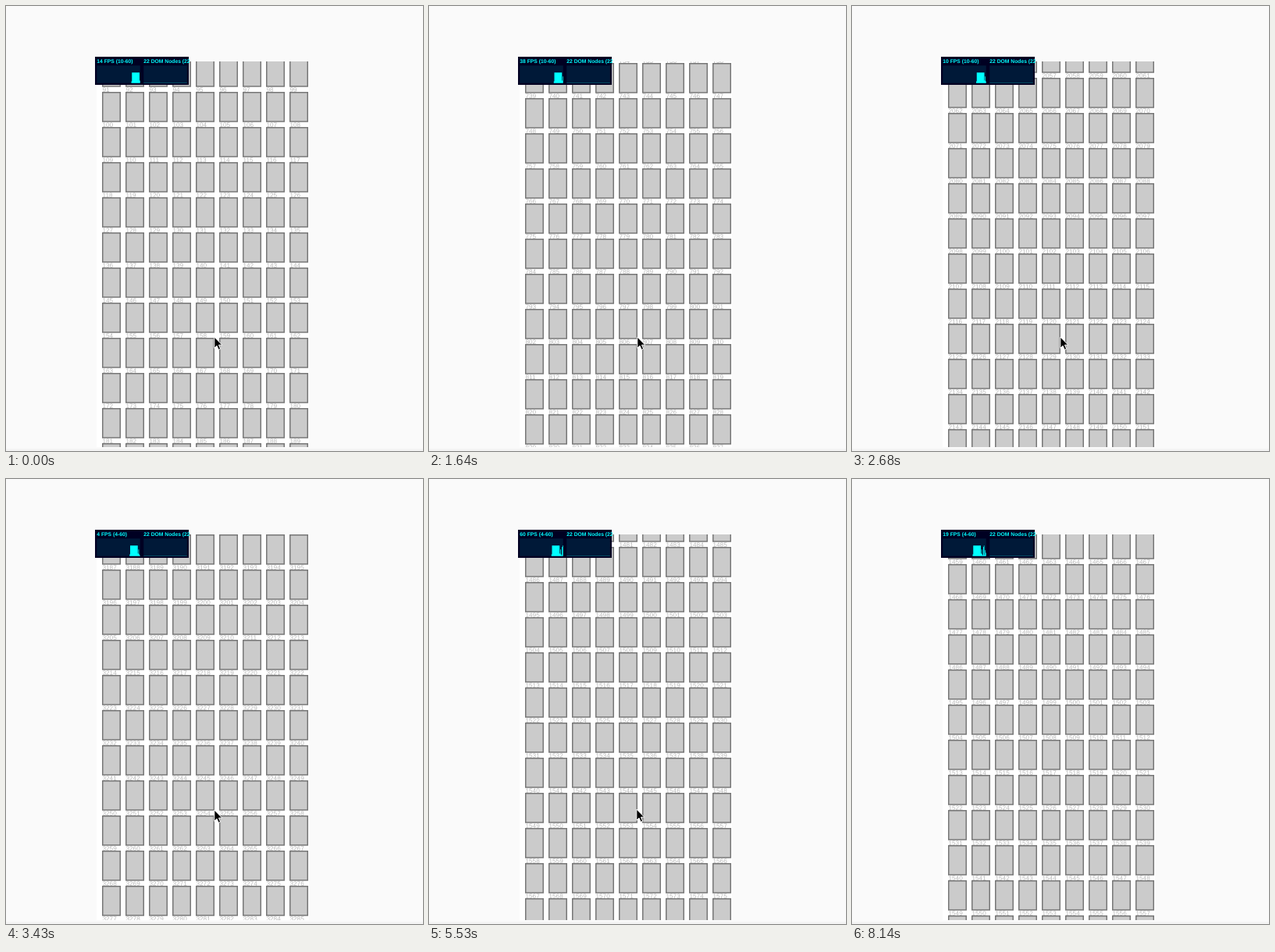
An HTML page for the animation above (8240 ms loop, 534x570 px).

```html
<!DOCTYPE html>
<html lang="en">
<head>
<meta charset="utf-8">
<title>Infinite scroll grid</title>
<style>
  html, body { margin: 0; width: 100%; height: 100%; overflow: hidden; background: #fafafa; }
  svg { display: block; width: 534px; height: 570px; }
  text { font-family: "Liberation Sans", Arial, sans-serif; text-rendering: geometricPrecision; }
  .cell { fill: #cbcbcb; stroke: #777; stroke-width: 1.5; }
  .label { font-size: 8.2px; fill: #b8b8b8; }
  .stat { font-size: 6.75px; font-weight: bold; fill: #0ff; }
</style>
</head>
<body>
<svg viewBox="0 0 534 570">
  <defs>
    <clipPath id="view"><rect x="114" y="71" width="274" height="494"/></clipPath>
    <clipPath id="meter"><rect x="114" y="65" width="121" height="36"/></clipPath>
  </defs>
  <rect width="534" height="570" fill="#fafafa"/>
  <rect y="567" width="534" height="3" fill="#f4f4f4"/>
  <rect x="116" y="71" width="272" height="494" fill="#fff"/>
  <g id="grid" clip-path="url(#view)"></g>
  <g clip-path="url(#meter)">
    <rect x="114" y="65" width="120" height="36" fill="#002"/>
    <rect x="116.25" y="76.25" width="55.5" height="22.5" fill="#001938"/>
    <rect x="176.25" y="76.25" width="55.5" height="22.5" fill="#001938"/>
    <rect x="176.25" y="98.1" width="55.5" height=".65" fill="#05697c"/>
    <path id="bars" fill="#0ff"/>
    <text id="fps" class="stat" x="116.25" y="73.4"/>
    <text class="stat" x="176.25" y="73.4">22 DOM Nodes (22-22)</text>
  </g>
  <path id="cursor" d="M0 0V14.2L3.2 11.2L5.4 16.3L7.9 15.2L5.7 10.2H10Z"
        fill="#000" stroke="#fff" stroke-width="1"/>
</svg>
<script>
const LOOP = 8240, COLS = 9, ROWS = 12, PITCH_X = 30, PITCH_Y = 45, TOP = 71, LEFT = 123;
const FRAME = 148, METER_PERIOD = 1017;

// The page repaints in short bursts and rests in between
const BURSTS = [[0, 450], [740, 1780], [1780, 3580], [4930, 5530], [5800, 5950],
  [6250, 6250], [6690, 6990], [6990, 7840]];

// Where the scroll offset turns or changes speed
const STOPS = [[0, 456], [450, 640], [1040, 960], [2080, 5768], [3430, 15930], [4780, 15952],
  [5530, 7409], [6250, 2785], [6990, 2119], [7840, 7297]];

const FPS = [14, 38, 10, 4, 52, 60, 6, 33, 19];
const HISTORY = [10, ...Array(13).fill(60)];

const POINTER = [[0, 266, 423], [4330, 265, 422], [5800, 264, 420], [7560, 456, 547], [7700, -50, -50]];

const $ = id => document.getElementById(id);
const latest = (list, t) => list.filter(k => k[0] <= t).pop();

function add(parent, tag, attrs) {
  const el = document.createElementNS("http://www.w3.org/2000/svg", tag);
  for (const key in attrs) el.setAttribute(key, attrs[key]);
  return parent.appendChild(el);
}

const rows = Array.from({ length: ROWS }, () => {
  const group = add($("grid"), "g", {});
  const labels = Array.from({ length: COLS }, (_, c) => {
    const x = LEFT + c * PITCH_X;
    add(group, "rect", { class: "cell", x: x + .75, y: .75, width: 22.5, height: 37.2 });
    return add(group, "text", { class: "label", x: x + .5, y: 44.7 });
  });
  return { group, labels };
});

// Time of the last repaint, with the frames spread evenly over a burst
function lastPaint(t) {
  const [from, to] = latest(BURSTS, t);
  const step = (to - from) / Math.round((to - from) / FRAME) || FRAME;
  return Math.min(to, Math.round((from + Math.floor((t - from) / step + .02) * step) / 10) * 10);
}

function scrollAt(t) {
  const i = STOPS.findIndex(s => s[0] > t);
  if (i < 0) return STOPS[STOPS.length - 1][1];
  const [t0, s0] = STOPS[i - 1], [t1, s1] = STOPS[i];
  return Math.round(s0 + (s1 - s0) * (t - t0) / (t1 - t0));
}

function drawGrid(scroll) {
  const first = Math.floor(scroll / PITCH_Y);
  rows.forEach(({ group, labels }, i) => {
    const row = first + i;
    group.setAttribute("transform", `translate(0 ${TOP + row * PITCH_Y - scroll})`);
    labels.forEach((label, c) => { label.textContent = row * COLS + c + 1; });
  });
}

function drawMeter(t) {
  const seen = FPS.slice(0, Math.floor(t / METER_PERIOD) + 1);
  const values = HISTORY.concat(seen);
  $("fps").textContent = `${seen[seen.length - 1]} FPS (${Math.min(...values)}-60)`;
  $("bars").setAttribute("d", values.map((v, i) => {
    const x = 171.75 - .75 * (values.length - i), h = v * .225;
    return `M${x} 98.75v${-h}h.75v${h}z`;
  }).join(""));
}

function draw(t) {
  drawGrid(scrollAt(lastPaint(t)));
  drawMeter(t);
  const [, x, y] = latest(POINTER, t);
  $("cursor").setAttribute("transform", `translate(${x + .8} ${y + 1})`);
}

const start = performance.now();
function loop() {
  draw((performance.now() - start) % LOOP);
  requestAnimationFrame(loop);
}
loop();
</script>
</body>
</html>
```
